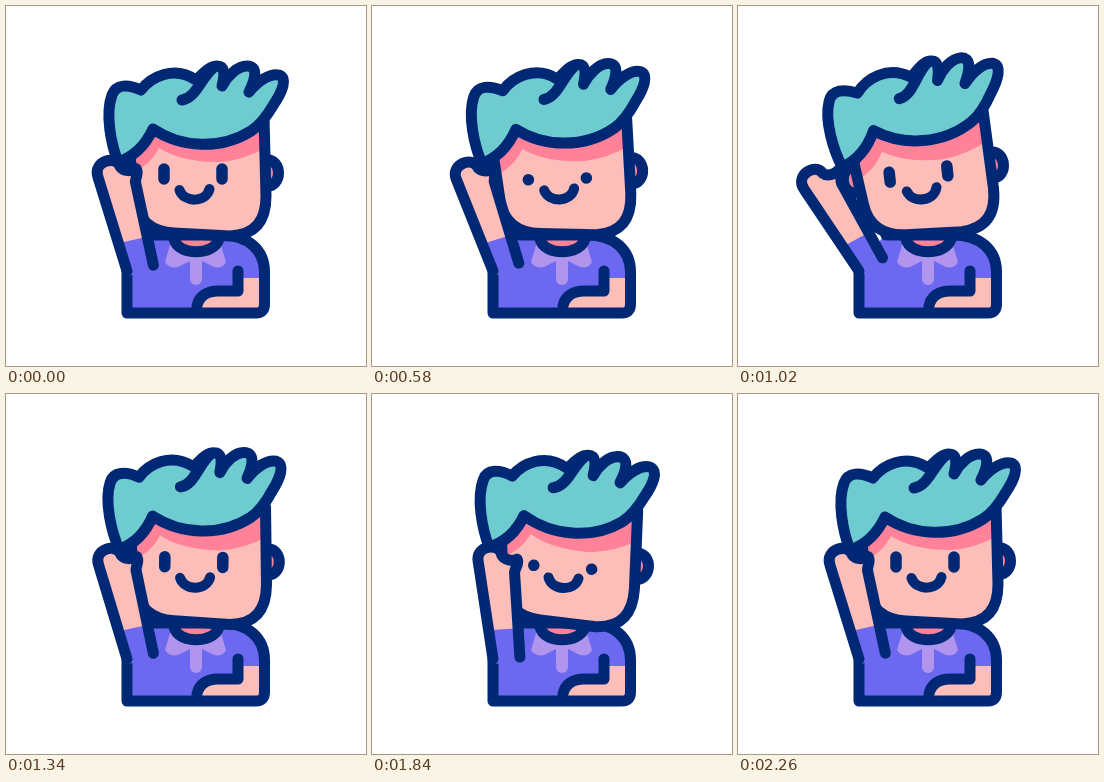
An HTML page with a canvas for the animation above (2.4 s loop, 360 px wide and 360 px high).

```html
<!DOCTYPE html>
<html lang="en">
<head>
<meta charset="utf-8">
<title>Waving boy</title>
<style>
html, body { margin: 0; width: 100%; height: 100%; overflow: hidden; background: #fff; }
canvas { display: block; width: 360px; height: 360px; }
</style>
</head>
<body>
<canvas id="stage"></canvas>
<script>
const LOOP = 2400;
const NAVY = '#002875', TEAL = '#6ecbd0', SKIN = '#fdbdb8', BLUSH = '#ff8299';
const SHIRT = '#6c69f0', LILAC = '#b094ee';
const RAD = Math.PI / 180;

const canvas = document.getElementById('stage');
const ctx = canvas.getContext('2d');
const dpr = window.devicePixelRatio || 1;
canvas.width = canvas.height = 360 * dpr;

const P = d => new Path2D(d);
const torso = P('M121 307 V265 L146 229 H215 C242 229 258.5 244 258.5 266 V298 Q258 307 250 307 Z');
const torsoLine = P('M121 265 V307 H250 Q258.5 307 258.5 298 V266 C258.5 244 242 229 215 229 H148');
const forearm = P('M193 302 C194 292 202 287 212 286 H234 V272 H258 V298 Q258 306 250 306 H193 Z');
const forearmLine = P('M191 300 C193 290 201 285 212 285 H232 V265');
const flaps = P('M165 236 L159 256 Q163 263 172 261 L190 252 L208 261 Q217 263 220 256 L214 236 Z');
const placket = P('M184 250 H196 V273 A6 6 0 0 1 184 273 Z');
const neck = P('M168 228 C170 252 211 252 213 228 Z');
const collar = P('M168 233 C172 250 208 250 213 233');
const face = P('M258 112 L260 190 C260 214 250 229 224 230 L168 227 C146 226 131 214 129 192 L124 150 L147 112 Z');
const shade = P('M118 171 Q143 162 153 142 Q175 156 213 156 Q240 154 264 139 V105 H118 Z');
const smile = P('M173.5 184 C178 197 200 197 203.5 183');
const hair = P('M112 156 C105 138 99 108 106 89 C110 78 122 78 135 84 C145 71 168 59 190 74 ' +
  'C197 68 203 60 211 60 C219 60 219 68 216 80 C222 69 232 60 241 60 C252 60 250 72 243 86 ' +
  'C252 75 264 67 273 69 C282 72 276 86 268 98 C261 110 253 120 245 125 ' +
  'C215 144 175 142 147 123 C140 138 130 150 112 156 Z');
const lock = P('M176 94 C190 92 195 72 207 62');
// Arm is drawn upright around the elbow.
const arm = P('M0 0 L-8 -98 C-10 -115 15 -116 16 -103 C18 -98 26 -96 31 -98 C33 -93 29 -91 27.5 -85 L27 0');
const sleeve = P('M0 5 V0 L-2.4 -29 H27 V5 Z');

function fill(path, color) {
  ctx.fillStyle = color;
  ctx.fill(path);
}

function line(path, width = 11) {
  ctx.strokeStyle = NAVY;
  ctx.lineWidth = width;
  ctx.stroke(path);
}

// Brisk start, soft landing.
function ease(u) {
  return 0.5 * u * (1 - u) * (1 - u) + u * u * (3 - 2 * u);
}

// Piecewise motion over evenly spaced poses: rest, left, right, rest.
function swing(t, left, right) {
  const poses = [0, left, right, 0];
  const u = Math.min(Math.max((t - 400) / 620, 0), 3);
  const i = Math.min(Math.floor(u), 2);
  return poses[i] + (poses[i + 1] - poses[i]) * ease(u - i);
}

function blink(t) {
  const near = Math.min(Math.abs(t - 580), Math.abs(t - 1840));
  const u = Math.min(Math.max((150 - near) / 130, 0), 1);
  return u * u * (3 - 2 * u);
}

function turn(x, y, deg) {
  ctx.translate(x, y);
  ctx.rotate(deg * RAD);
}

function drawBody() {
  fill(torso, SHIRT);
  fill(flaps, LILAC);
  fill(placket, LILAC);
  fill(neck, BLUSH);
  line(collar);
  fill(forearm, SKIN);
  line(forearmLine);
  line(torsoLine);
}

function drawHair(t) {
  // The hair lifts on the left swing and lags behind on the right one.
  const lean = swing(t, 0, 0.06);
  ctx.transform(1, 0, lean, 1, -lean * 170, swing(t, -3, 0));
  turn(190, 130, swing(t, 0, -2));
  ctx.translate(-190, -130);
  fill(hair, TEAL);
  line(hair);
  line(lock);
}

function drawHead(t) {
  ctx.save();
  turn(184, 228, swing(t, -6.2, 5.7));
  ctx.translate(-184, -228);

  for (const x of [122, 262]) {
    const ear = new Path2D();
    ear.ellipse(x, 167, 10.5, 13, 0, 0, 7);
    fill(ear, BLUSH);
    line(ear);
  }

  fill(face, SKIN);
  ctx.save();
  ctx.clip(face);
  fill(shade, BLUSH);
  ctx.restore();
  line(face);

  const top = 163 + 9.9 * blink(t);
  for (const x of [158, 216]) line(P(`M${x} ${top} V173`), 11.5);
  line(smile, 10);

  drawHair(t);
  ctx.restore();
}

function drawArm(t) {
  ctx.save();
  turn(121, 265, -12.5 + swing(t, -16.7, 12.5));
  fill(arm, SKIN);
  fill(sleeve, SHIRT);
  line(arm);
  ctx.restore();
}

function draw(now) {
  const t = now % LOOP;
  ctx.setTransform(dpr, 0, 0, dpr, 0, 0);
  ctx.fillStyle = '#fff';
  ctx.fillRect(0, 0, 360, 360);
  ctx.lineCap = ctx.lineJoin = 'round';
  drawBody();
  drawHead(t);
  drawArm(t);
}

let start;
function tick(now) {
  if (start === undefined) start = now;
  draw(now - start);
  requestAnimationFrame(tick);
}
draw(0);
requestAnimationFrame(tick);
</script>
</body>
</html>
```
